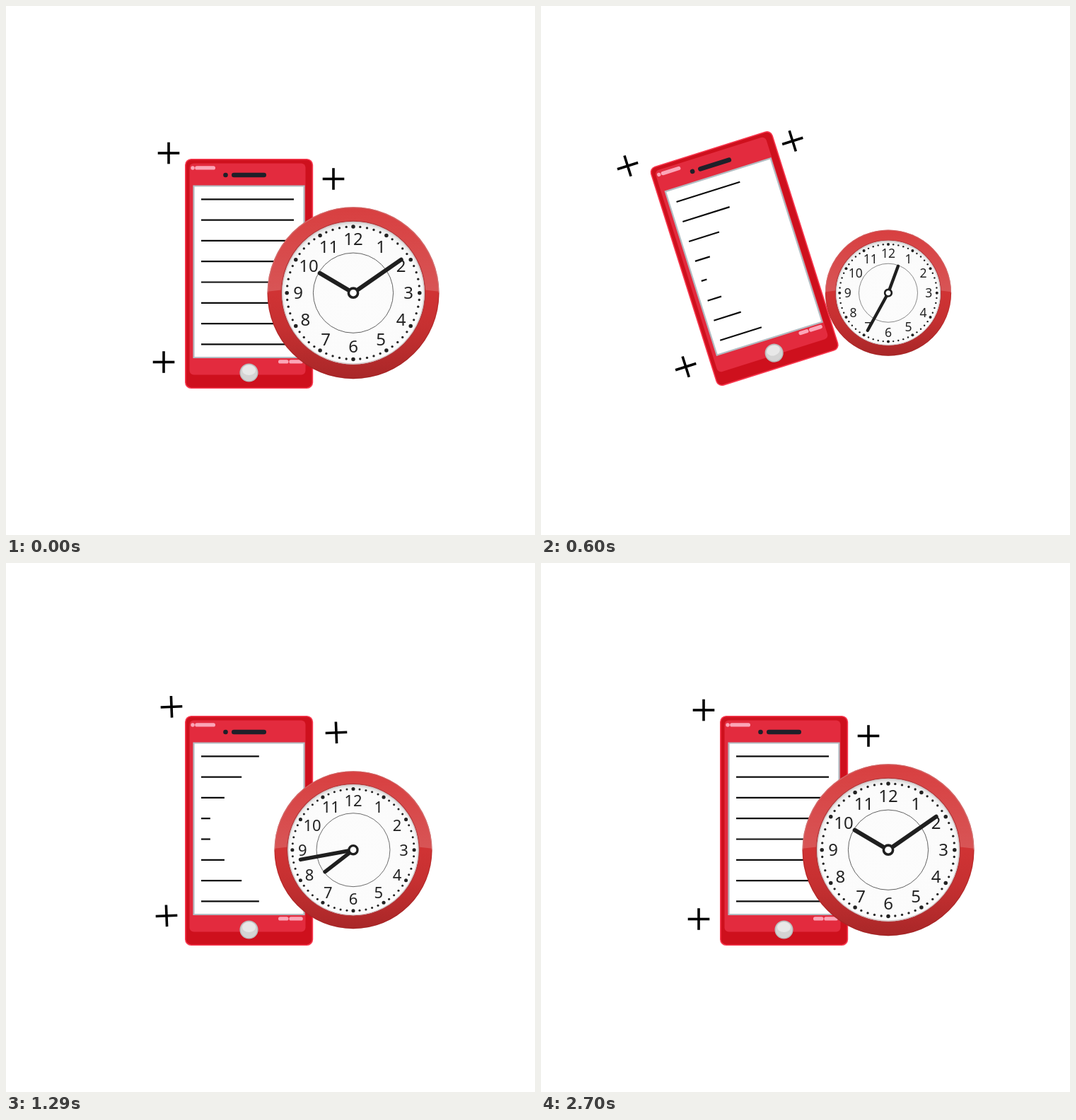
An HTML page with a canvas that plays this animation: 748 by 748 pixels, repeating every 2.73 s.

```html
<!DOCTYPE html>
<html lang="en">
<head>
<meta charset="utf-8">
<title>Phone and clock</title>
<style>
  html, body { margin: 0; width: 100%; height: 100%; overflow: hidden; background: #fff; }
  canvas { display: block; width: 748px; height: 748px; }
</style>
</head>
<body>
<canvas id="stage" width="748" height="748"></canvas>
<script>
const ctx = document.getElementById('stage').getContext('2d');
const TAU = Math.PI * 2, RAD = Math.PI / 180;
const STEP = 30, STEPS = 91;
const clamp = v => Math.max(0, Math.min(1, v));

// Smooth curve through [time, value] keys, at rest at both ends
function track(keys) {
  const last = keys.length - 1;
  const slope = i => i === 0 || i === last ? 0
    : (keys[i + 1][1] - keys[i - 1][1]) / (keys[i + 1][0] - keys[i - 1][0]);
  return t => {
    if (t >= keys[last][0]) return keys[last][1];
    const i = keys.findIndex(k => k[0] > t) - 1;
    const [t0, a] = keys[i], [t1, b] = keys[i + 1];
    const d = t1 - t0, u = (t - t0) / d, v = 1 - u;
    return a * v * v * (1 + 2 * u) + b * u * u * (3 - 2 * u)
      + d * u * v * (slope(i) * v - slope(i + 1) * u);
  };
}

const clockScale = track([[0, 1], [13, .805], [18, .757], [29, .624], [31, .619], [37, .78], [43, .918], [48, 1]]);
const hourTurn = track([[0, 0], [13, 24.4], [29, 168.4], [37, 250.2], [43, 291.6], [59, 347.8], [76, 360]]);
const minuteTurn = track([[0, 0], [13, 47.6], [29, 324], [37, 482], [43, 564.4], [59, 683], [76, 720]]);

function phoneTilt(t) {
  if (t < 29.5) return -20 * Math.sin(t / 29.5 * Math.PI / 2);
  return -10 * (1 + Math.cos(Math.PI * clamp((t - 31.6) / 11)));
}

function crossTurn(t) {
  const easeOut = u => 1 - (1 - clamp(u)) ** 3;
  return 90 * easeOut(t / 16) + 270 * easeOut((t - 27.5) / 51.5);
}

// Each text line shrinks and grows three times, two steps after the one above
function lineLength(t, index) {
  const n = t - 2 * index;
  if (n <= 0 || n >= 72) return 131;
  const x = Math.abs(n % 24 - 12) / 6 - 1;
  const u = n / 12;
  const lead = u < 1 ? 64 * u * (1 - u) ** 2 : 0;
  return 69.5 + 74 * x - 12.5 * x ** 5 - lead;
}

function circle(x, y, r, fill, stroke, width) {
  ctx.beginPath();
  ctx.arc(x, y, r, 0, TAU);
  paint(fill, stroke, width);
}

function box(x, y, w, h, r, fill, stroke, width) {
  ctx.beginPath();
  ctx.roundRect(x, y, w, h, r);
  paint(fill, stroke, width);
}

function paint(fill, stroke, width) {
  if (fill) { ctx.fillStyle = fill; ctx.fill(); }
  if (stroke) { ctx.strokeStyle = stroke; ctx.lineWidth = width; ctx.stroke(); }
}

function line(x1, y1, x2, y2, color, width, cap = 'butt') {
  ctx.lineCap = cap;
  ctx.beginPath();
  ctx.moveTo(x1, y1);
  ctx.lineTo(x2, y2);
  paint(null, color, width);
}

function shade(gradient, ...stops) {
  stops.forEach(([at, color]) => gradient.addColorStop(at, color));
  return gradient;
}

function drawCross(x, y, turn) {
  ctx.save();
  ctx.translate(x - .25, y - 4.25);
  ctx.rotate(turn * RAD);
  ctx.translate(.25, 4.25);
  line(-15.3, 0, 15.3, 0, '#000', 3.6);
  line(0, -15.3, 0, 15.3, '#000', 3.6);
  ctx.restore();
}

function drawPhone(t) {
  const pink = '#fba6b8', dark = '#1f2029';
  ctx.save();
  ctx.translate(246, 549.6);
  ctx.rotate(phoneTilt(t) * RAD);
  ctx.translate(-246, -549.6);

  const turn = crossTurn(t);
  drawCross(230, 208, turn);
  drawCross(463, 244.5, turn);
  drawCross(223, 503.5, turn);

  box(253.8, 216.8, 179.6, 323.4, 8, '#ce101d', '#f8384f', 1.6);
  box(259.5, 222.5, 164, 299, 6, '#e32b3e');
  box(265.5, 254.5, 156, 242.5, 0, '#fff', '#b2bcc2', 2.2);

  circle(310.5, 239, 3.3, dark);
  box(319, 235.7, 49, 6.6, 3.3, dark);
  circle(264, 229, 2.7, pink);
  box(267.2, 226.2, 28.8, 5.4, 2.7, pink);
  box(385, 500.2, 14.5, 5.4, 2.7, pink);
  box(400.3, 500.2, 19.5, 5.4, 2.7, pink);

  circle(343.5, 518.5, 12.3, '#d4d4d4', '#b9bcbc', 1.5);
  ctx.beginPath();
  ctx.ellipse(343.5, 514.8, 9.5, 7.2, 0, 0, TAU);
  paint('#e8e8e8');

  for (let i = 0; i < 8; i++) {
    const y = 273.3 + 29.3 * i;
    line(276, y, 276 + lineLength(t, i), y, '#0c0c0c', 2.2);
  }
  ctx.restore();
}

function drawHand(angle, length) {
  ctx.save();
  ctx.rotate(angle * RAD);
  line(0, -6, 0, 3 - length, '#1f1f1f', 6, 'round');
  ctx.restore();
}

function drawClock(t) {
  ctx.save();
  ctx.translate(491, 405.7);
  const s = clockScale(t);
  ctx.scale(s, s);

  const rim = shade(ctx.createLinearGradient(0, -121, 0, 121),
    [0, '#d63536'], [.5, '#d03334'], [.7, '#c63031'], [1, '#a92728']);
  circle(0, 0, 121.5, rim);
  circle(0, 0, 120.9, null, 'rgba(150,30,30,.35)', 1.2);

  // Gloss on the upper half of the rim
  ctx.beginPath();
  ctx.moveTo(-121.5, -2);
  ctx.arc(0, 0, 121.5, Math.PI, TAU);
  ctx.lineTo(121.5, -2);
  ctx.quadraticCurveTo(0, -18, -121.5, -2);
  paint(shade(ctx.createLinearGradient(0, -121, 0, 0),
    [0, 'rgba(255,255,255,.05)'], [1, 'rgba(255,255,255,.17)']));
  ctx.beginPath();
  ctx.arc(0, 0, 120.8, Math.PI, TAU);
  paint(null, 'rgba(255,255,255,.22)', 1.2);

  const face = shade(ctx.createRadialGradient(0, 4, 0, 0, 4, 106),
    [0, '#fcfcfc'], [.9, '#fbfbfb'], [.95, '#ececec'], [1, '#c6c6c6']);
  circle(0, 0, 101.5, face, '#b3373a', 1.5);
  circle(0, 0, 100.3, null, '#d6cccc', 1.3);
  circle(0, 0, 56.6, null, '#3a3a3a', .8);

  for (let i = 0; i < 60; i++) {
    const a = i * 6 * RAD;
    circle(93.8 * Math.sin(a), -93.8 * Math.cos(a), i % 5 ? 1.65 : 2.75, '#222');
  }

  ctx.font = '24px "Noto Sans", "Open Sans", sans-serif';
  ctx.textAlign = 'center';
  ctx.fillStyle = '#222';
  for (let n = 1; n <= 12; n++) {
    const a = n * 30 * RAD;
    const shift = n === 10 || n === 11 ? 4.5 : 0;
    ctx.fillText(n, 78 * Math.sin(a) + shift, 8.7 - 76 * Math.cos(a));
  }

  drawHand(300.6 + hourTurn(t), 58);
  drawHand(55.2 + minuteTurn(t), 85.5);
  circle(0, 0, 6.6, '#fff', '#1f1f1f', 3.6);
  ctx.restore();
}

function draw(now) {
  const t = Math.floor(now / STEP) % STEPS;
  ctx.fillStyle = '#fff';
  ctx.fillRect(0, 0, 748, 748);
  drawPhone(t);
  drawClock(t);
}

const start = performance.now();
function tick() {
  draw(performance.now() - start);
  requestAnimationFrame(tick);
}
tick();
</script>
</body>
</html>
```
